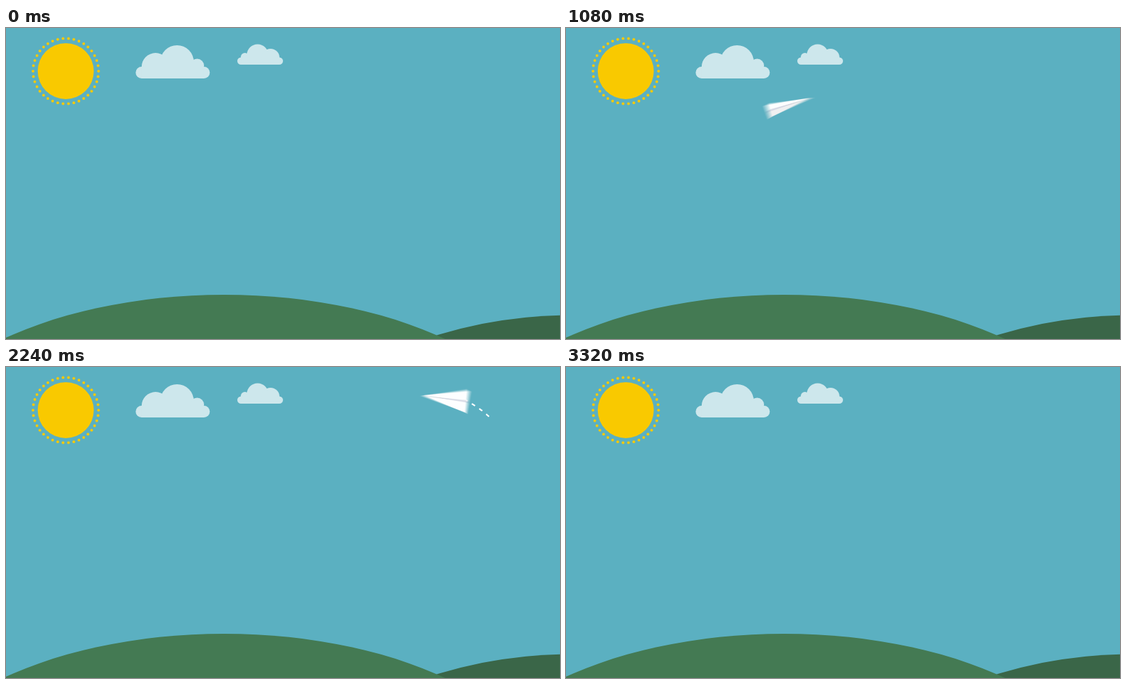
Recreate the animation shown at these times as an HTML page with a canvas. Size 800 px wide and 450 px high, loop 4400 ms.

```html
<!DOCTYPE html>
<html lang="en">
<head>
<meta charset="utf-8">
<title>Paper plane</title>
<style>
  html, body { margin: 0; width: 100%; height: 100%; overflow: hidden; background: #5bb0c1; }
  canvas { display: block; width: 100vw; height: 100vh; }
</style>
</head>
<body>
<canvas id="stage" width="800" height="450"></canvas>
<script>
const W = 800, H = 450, LOOP = 4400, STEP = 40;
const START = 600, END = 3320;
const LENGTH = 67, SHUTTER = 20, SAMPLES = 14;

// Key points of the nose: time, x, y
const flight = [
  [600, 25, 372], [667, 95, 321], [800, 202, 201], [960, 295, 118],
  [1120, 382, 105], [1440, 554, 202], [1590, 692, 202], [1690, 735, 138],
  [1920, 683, 60], [2240, 597, 42], [2560, 450, 108], [2710, 356, 234],
  [2840, 429, 373], [3000, 612, 372], [3320, 882, 306]
];

// Apparent half width as the plane rolls: time, width
const roll = [[600, 15], [800, 15], [1440, 5], [1920, 14.5], [2560, 17.5], [3320, 15]];

// Each trail starts at a moment of the flight, waits, then is eaten up ever faster
const trails = [
  { from: 667, hold: 840, gain: 0.0051, dash: [5, 3] },
  { from: 1590, hold: 1900, gain: 0.0024, dash: [5.5, 7.3] }
];

const ctx = document.getElementById('stage').getContext('2d');

function layer() {
  const canvas = document.createElement('canvas');
  canvas.width = W;
  canvas.height = H;
  return canvas.getContext('2d');
}
const scene = layer(), exposure = layer(), blur = layer();

// Smooth curve through unevenly spaced rows, straight beyond both ends
function sample(rows, time) {
  const last = rows.length - 1;
  const t = Math.min(Math.max(time, rows[0][0]), rows[last][0]);
  let i = 0;
  while (i < last - 1 && t > rows[i + 1][0]) i++;
  const a = rows[i], b = rows[i + 1], span = b[0] - a[0], u = (t - a[0]) / span;
  const slope = (k, c) => {
    const p = rows[Math.max(k - 1, 0)], q = rows[Math.min(k + 1, last)];
    return (q[c] - p[c]) / (q[0] - p[0]);
  };
  return a.slice(1).map((_, k) => {
    const c = k + 1, m = slope(i, c), n = slope(i + 1, c);
    return a[c] * (1 + 2 * u) * (1 - u) ** 2 + b[c] * u * u * (3 - 2 * u) +
      span * u * (1 - u) * (m * (1 - u) - n * u) +
      (time - t) * (time < t ? m : n);
  });
}

function disc(g, x, y, r, ry = r) {
  g.beginPath();
  g.ellipse(x, y, r, ry, 0, 0, 2 * Math.PI);
  g.fill();
}

function polygon(g, color, points) {
  g.fillStyle = color;
  g.beginPath();
  points.forEach(p => g.lineTo(...p));
  g.fill();
}

function cloud(g, left, right, bottom, r, bumps) {
  g.save();
  g.beginPath();
  g.rect(0, 0, W, bottom);
  g.clip();
  g.fillStyle = '#cde7ec';
  disc(g, left + r, bottom - r, r);
  disc(g, right - r, bottom - r, r);
  g.fillRect(left + r, bottom - 2 * r, right - left - 2 * r, 2 * r);
  bumps.forEach(b => disc(g, ...b));
  g.restore();
}

function paintScene(g) {
  g.fillStyle = '#5bb0c1';
  g.fillRect(0, 0, W, H);
  g.fillStyle = '#f9c900';
  disc(g, 86.3, 62.4, 40.5);
  const dots = 38;
  for (let i = 0; i < dots; i++) {
    const a = i * 2 * Math.PI / dots;
    disc(g, 86.3 + 47.3 * Math.cos(a), 62.4 + 47.3 * Math.sin(a), 2);
  }
  cloud(g, 187.3, 294.3, 73, 8.5, [[216, 56.3, 20.2], [247, 49.2, 24.2], [276, 54.5, 10]]);
  cloud(g, 334, 400, 53, 5.3, [[345, 42, 6], [363.3, 39, 15.5], [382, 43, 13]]);
  g.fillStyle = '#3a6648';
  disc(g, 815, 1068.5, 653);
  g.fillStyle = '#447a53';
  disc(g, 315, 639, 480, 253);
}

// Moment at which the nose passed the place where the tail is now
function tailTime(t) {
  const [x, y] = sample(flight, t);
  let s = t, gap = 0;
  while (gap < LENGTH) {
    s -= 2;
    const [px, py] = sample(flight, s);
    gap = Math.hypot(px - x, py - y);
  }
  return s;
}

function paintPlane(g, t) {
  const [x, y] = sample(flight, t), [tx, ty] = sample(flight, tailTime(t));
  const [wing] = sample(roll, t);
  const shade = Math.min(247, 188 + wing * 4.5);
  g.save();
  g.translate(x, y);
  g.rotate(Math.atan2(y - ty, x - tx));
  polygon(g, '#fafafa', [[0, 0], [-LENGTH, -wing], [-LENGTH, 0]]);
  polygon(g, `rgb(${shade},${shade},${shade})`, [[0, 0], [-LENGTH, 0], [-LENGTH, wing]]);
  polygon(g, '#cdd2d7', [[0, 0], [-LENGTH, -1.3], [-LENGTH, 1.3]]);
  g.restore();
}

function paintTrail(t, { from, hold, gain, dash }) {
  const start = from + gain * Math.max(0, t - hold) ** 2, end = tailTime(t);
  if (start >= end) return;
  ctx.beginPath();
  for (let s = start; s < end; s += 4) ctx.lineTo(...sample(flight, s));
  ctx.lineTo(...sample(flight, end));
  ctx.setLineDash(dash);
  ctx.lineWidth = 2.1;
  ctx.strokeStyle = '#fff';
  ctx.stroke();
}

function paint(t) {
  ctx.drawImage(scene.canvas, 0, 0);
  if (t < START || t >= END) return;
  trails.forEach(trail => paintTrail(t, trail));

  // Average several moments for motion blur
  blur.clearRect(0, 0, W, H);
  for (let i = 0; i < SAMPLES; i++) {
    exposure.clearRect(0, 0, W, H);
    paintPlane(exposure, t - SHUTTER * i / (SAMPLES - 1));
    blur.drawImage(exposure.canvas, 0, 0);
  }
  ctx.drawImage(blur.canvas, 0, 0);
}

blur.globalCompositeOperation = 'lighter';
blur.globalAlpha = 1 / SAMPLES;
paintScene(scene);

const origin = performance.now();
let shown = -1;
function tick() {
  const t = Math.floor((performance.now() - origin) % LOOP / STEP) * STEP;
  if (t !== shown) paint(shown = t);
  requestAnimationFrame(tick);
}
tick();
</script>
</body>
</html>
```
